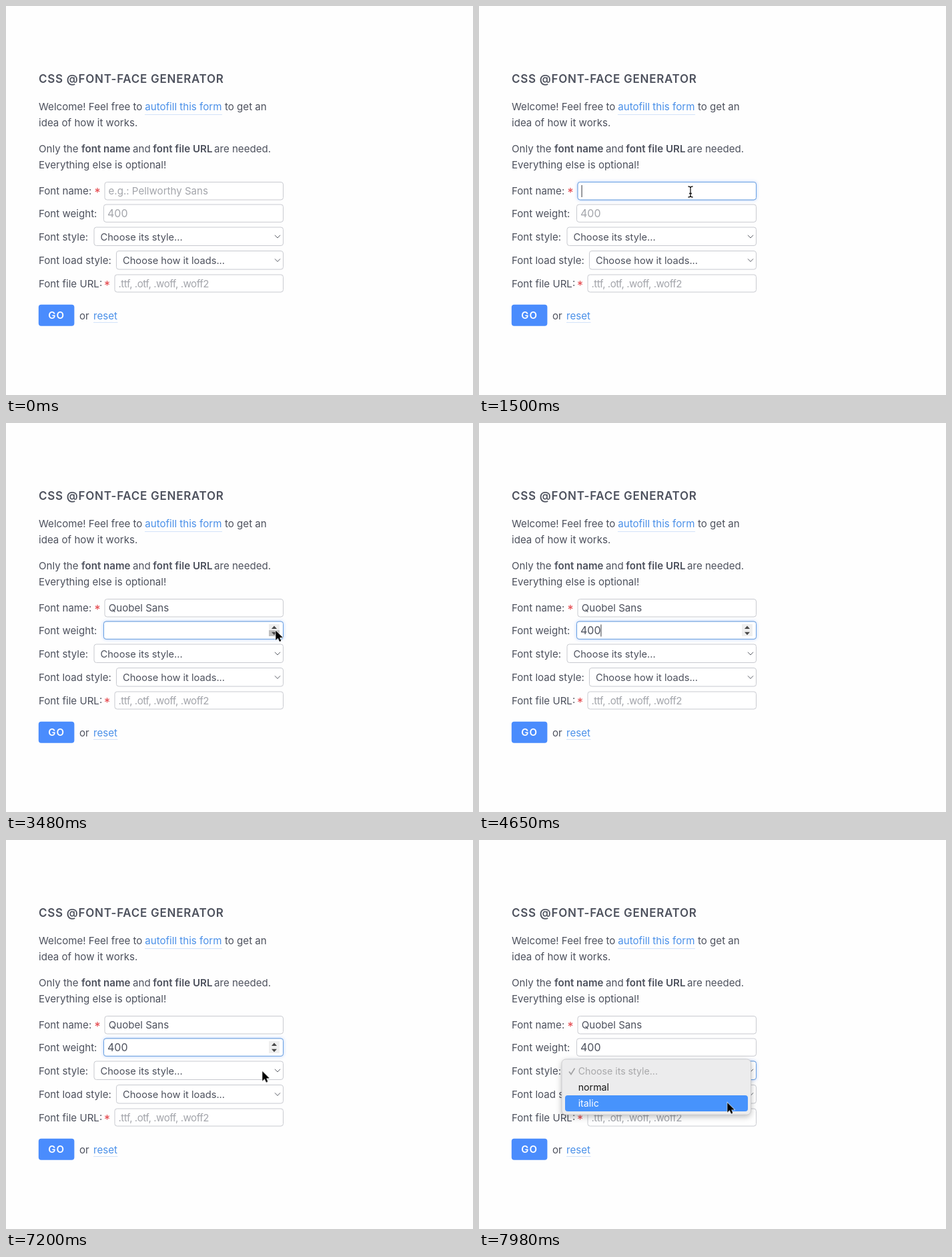
These frames come from a looping animation (700x582 px, 8000 ms). An HTML page:

```html
<!DOCTYPE html>
<html lang="en">
<head>
<meta charset="utf-8">
<title>Font-face form</title>
<style>
html, body { margin: 0; width: 100%; height: 100%; overflow: hidden; background: #fefefe; }
svg { display: block; width: 700px; height: 582px; }
text { font: 15.1px Inter, sans-serif; fill: #4d515d; white-space: pre; }
.h { font-size: 17px; font-weight: 600; letter-spacing: .72px; }
.b { font-weight: 600; }
.link { fill: #4a90e9; }
.line { stroke: #d3e3fa; }
.star { font-size: 18px; fill: #e5484d; }
.hint { fill: #a3a5ab; }
.files { letter-spacing: -.48px; }
.num { font-size: 16px; }
.pick { font-size: 14.65px; }
.go { fill: #fff; font-size: 15px; font-weight: 600; letter-spacing: 1px; }
.box { fill: #fff; stroke: #c8cad0; }
.ring { fill: #fff; stroke: #69a0e2; filter: drop-shadow(0 0 2.5px rgba(74, 140, 255, .4)); }
.chev { fill: none; stroke: #5a5d66; }
.caret { stroke: #33363d; }
.menu text { font-size: 14.2px; fill: #161616; }
.menu .off { fill: #a8a8aa; }
.menu .lit text { fill: #fff; }
.panel { fill: #ececed; stroke: #c6c6c8; stroke-width: .8; filter: drop-shadow(0 3px 4px rgba(0, 0, 0, .25)); }
.lit rect { fill: #4793fc; }

/* on/off states */
.t { visibility: hidden; animation: 8s step-end infinite; }
.ring1 { animation-name: ring1; }
.ring2 { animation-name: ring2; }
.late { animation-name: late; }
.hint1 { animation-name: hint1; }
.hint2 { animation-name: hint2; }
.spin { animation-name: spin; }
.up { animation-name: up; }
.down { animation-name: down; }
.lit1 { animation-name: lit1; }
.lit2 { animation-name: lit2; }
.arrow { animation-name: arrow; }
.beam { animation-name: beam; }
@keyframes ring1 { 0%, 40.875% { visibility: hidden } 16.125% { visibility: visible } }
@keyframes ring2 { 0%, 93% { visibility: hidden } 40.875% { visibility: visible } }
@keyframes late { 0% { visibility: hidden } 93%, 100% { visibility: visible } }
@keyframes hint1 { 0% { visibility: visible } 16.125%, 100% { visibility: hidden } }
@keyframes hint2 { 0% { visibility: visible } 40.875%, 100% { visibility: hidden } }
@keyframes spin { 0%, 93% { visibility: hidden } 30.4% { visibility: visible } }
@keyframes up { 0%, 72% { visibility: hidden } 69.375% { visibility: visible } }
@keyframes down { 0%, 44.1%, 83.6% { visibility: hidden } 40.875%, 80.625% { visibility: visible } }
@keyframes lit1 { 0%, 97.4% { visibility: hidden } 95.7% { visibility: visible } }
@keyframes lit2 { 0% { visibility: hidden } 97.4%, 100% { visibility: visible } }
@keyframes arrow {
  0%, 4.4%, 30.4%, 44.5% { visibility: hidden }
  .375%, 29.25%, 35.6%, 65.6%, 100% { visibility: visible }
}
@keyframes beam {
  0%, 19.875%, 29.25%, 35.6%, 54%, 65.6% { visibility: hidden }
  4.4%, 28.5%, 30.4%, 44.5%, 61.875% { visibility: visible }
}

.mouse { animation: move 8s ease-in-out infinite; }
@keyframes move {
  0%, .375% { transform: translate(684px, 330px); animation-timing-function: cubic-bezier(.2, .3, .4, 1) }
  7.125%, 9% { transform: translate(394px, 280px) }
  18.75%, 28.4% { transform: translate(317px, 278px); animation-timing-function: linear }
  30% { transform: translate(385px, 292.5px); animation-timing-function: ease-out }
  32.25%, 34.5% { transform: translate(392px, 311px) }
  37.5%, 43.75% { transform: translate(404px, 310px) }
  47.625%, 61.5% { transform: translate(252px, 312px) }
  67.5%, 75% { transform: translate(403px, 307px) }
  77.625%, 87.375% { transform: translate(403px, 315px) }
  90%, 93.75% { transform: translate(384px, 345.5px) }
  99.375%, 100% { transform: translate(372px, 392.5px) }
}
</style>
</head>
<body>
<svg viewBox="0 0 700 582">
  <text class="h" x="49" y="115.3">CSS @FONT-FACE GENERATOR</text>

  <text x="49" y="156">Welcome! Feel free to</text>
  <text class="link" x="208.3" y="156">autofill this form</text>
  <path class="line" d="M208 162.5H324"/>
  <text x="328" y="156">to get an</text>
  <text x="49" y="180">idea of how it works.</text>
  <text x="49" y="218.5">Only the</text>
  <text class="b" x="113" y="218.5">font name</text>
  <text x="190" y="218.5">and</text>
  <text class="b" x="220.3" y="218.5">font file URL</text>
  <text x="312" y="218.5">are needed.</text>
  <text x="49" y="242.5">Everything else is optional!</text>

  <text x="49" y="282">Font name:</text>
  <text class="star" x="132.5" y="286">*</text>
  <rect class="box" x="148" y="263.5" width="267.5" height="26.5" rx="3.5"/>
  <rect class="ring t ring1" x="148" y="263.5" width="267.5" height="26.5" rx="3.5"/>
  <text class="hint t hint1" x="153.5" y="282">e.g.: Pellworthy Sans</text>
  <text id="name" x="153.7" y="282"></text>
  <path id="nameCaret" class="caret" d="M0 268V286"/>

  <text x="49" y="315.7">Font weight:</text>
  <rect class="box" x="146.5" y="297" width="269" height="26.3" rx="3.5"/>
  <rect class="ring t ring2" x="146.5" y="297" width="269" height="26.3" rx="3.5"/>
  <text class="num hint t hint2" x="152" y="316">400</text>
  <text id="weight" class="num" x="152" y="316"></text>
  <path id="weightCaret" class="caret" d="M0 301.5V319.5"/>
  <g class="t spin">
    <rect x="394" y="301" width="16" height="18" fill="#efefef"/>
    <rect class="t up" x="394" y="301" width="16" height="9" fill="#bfbfbf"/>
    <rect class="t down" x="394" y="310" width="16" height="9" fill="#bfbfbf"/>
    <path d="M398 308l4-4.5 4 4.5zM398 312.7l4 4.5 4-4.5z" fill="#484848"/>
  </g>

  <text x="49" y="350.5">Font style:</text>
  <rect class="box" x="132" y="331" width="283.5" height="27.5" rx="3.5"/>
  <rect class="ring t late" x="132" y="331" width="283.5" height="27.5" rx="3.5"/>
  <text class="pick" x="141.5" y="350.5">Choose its style...</text>
  <path class="chev" d="M403 342.8l4 4.2 4-4.2"/>

  <text x="49" y="386">Font load style:</text>
  <rect class="box" x="165.5" y="366.5" width="250" height="27.5" rx="3.5"/>
  <text class="pick" x="175" y="386">Choose how it loads...</text>
  <path class="chev" d="M403 378.3l4 4.2 4-4.2"/>

  <text x="49" y="420.5">Font file URL:</text>
  <text class="star" x="147" y="424.5">*</text>
  <rect class="box" x="163" y="402" width="252.5" height="26" rx="3.5"/>
  <text class="hint files" x="168.5" y="420.5">.ttf, .otf, .woff, .woff2</text>

  <rect x="48.8" y="446.8" width="53.6" height="32" rx="4" fill="#4a8cfd"/>
  <text class="go" x="63.2" y="468.3">GO</text>
  <text x="110" y="469">or</text>
  <text class="link" x="131" y="469">reset</text>
  <path class="line" d="M131 473.5H167.5"/>

  <g class="menu t late">
    <rect class="panel" x="124" y="328" width="283.5" height="83" rx="6"/>
    <path d="M135 346.5l3 4 5.5-9" fill="none" stroke="#a0a0a2" stroke-width="1.6"/>
    <text class="off" x="148.7" y="351">Choose its style...</text>
    <text x="148.7" y="375">normal</text>
    <text x="148.7" y="399.3">italic</text>
    <g class="lit t lit1">
      <rect x="129" y="358" width="274" height="24" rx="4"/>
      <text x="148.7" y="375">normal</text>
    </g>
    <g class="lit t lit2">
      <rect x="129" y="382" width="274" height="24" rx="4"/>
      <text x="148.7" y="399.3">italic</text>
    </g>
  </g>

  <g class="mouse">
    <path class="t arrow" d="M.3 .5V15l3.4-3.2 2.3 5.2 2.4-1-2.2-5.1h4.7z" fill="#000" stroke="#fff" stroke-width="1.2" paint-order="stroke"/>
    <g class="t beam" fill="none">
      <path d="M-3.5-8Q0-8 0-6V6Q0 8-3.5 8M3.5-8Q0-8 0-6M3.5 8Q0 8 0 6M-2 2.5H2" stroke="#fff" stroke-width="3"/>
      <path d="M-3.5-8Q0-8 0-6V6Q0 8-3.5 8M3.5-8Q0-8 0-6M3.5 8Q0 8 0 6M-2 2.5H2" stroke="#111" stroke-width="1.3"/>
    </g>
  </g>
</svg>
<script>
const LOOP = 8000, BLINK = 500;
const typed = 'Quobel Sans';
const nameKeys = [...typed].map((_, i) => [1590 + i * 54, typed.slice(0, i + 1)]);
const weightKeys = [[4350, '4'], [4500, '40'], [4620, '400'], [5580, '450'], [6480, '400']];

function field(id, keys, from, to, wakes) {
  const text = document.getElementById(id);
  const caret = document.getElementById(id + 'Caret');
  const x = +text.getAttribute('x');
  const resets = [...wakes, ...keys.map(k => k[0])];
  return t => {
    const past = keys.filter(k => k[0] <= t);
    const value = past.length ? past[past.length - 1][1] : '';
    if (text.textContent !== value) text.textContent = value;
    const last = Math.max(...resets.filter(r => r <= t));
    const on = t >= from && t < to && Math.floor((t - last) / BLINK) % 2 === 0;
    caret.style.visibility = on ? 'visible' : 'hidden';
    if (on) caret.setAttribute('transform', `translate(${x + text.getComputedTextLength() + .4} 0)`);
  };
}

const fields = [
  field('name', nameKeys, 1290, 3270, [1290]),
  field('weight', weightKeys, 3550, 7440, [3550, 5550, 6450])
];
let start;
function tick(now) {
  start ??= now;
  const t = (now - start) % LOOP;
  fields.forEach(draw => draw(t));
  requestAnimationFrame(tick);
}
requestAnimationFrame(tick);
</script>
</body>
</html>
```
